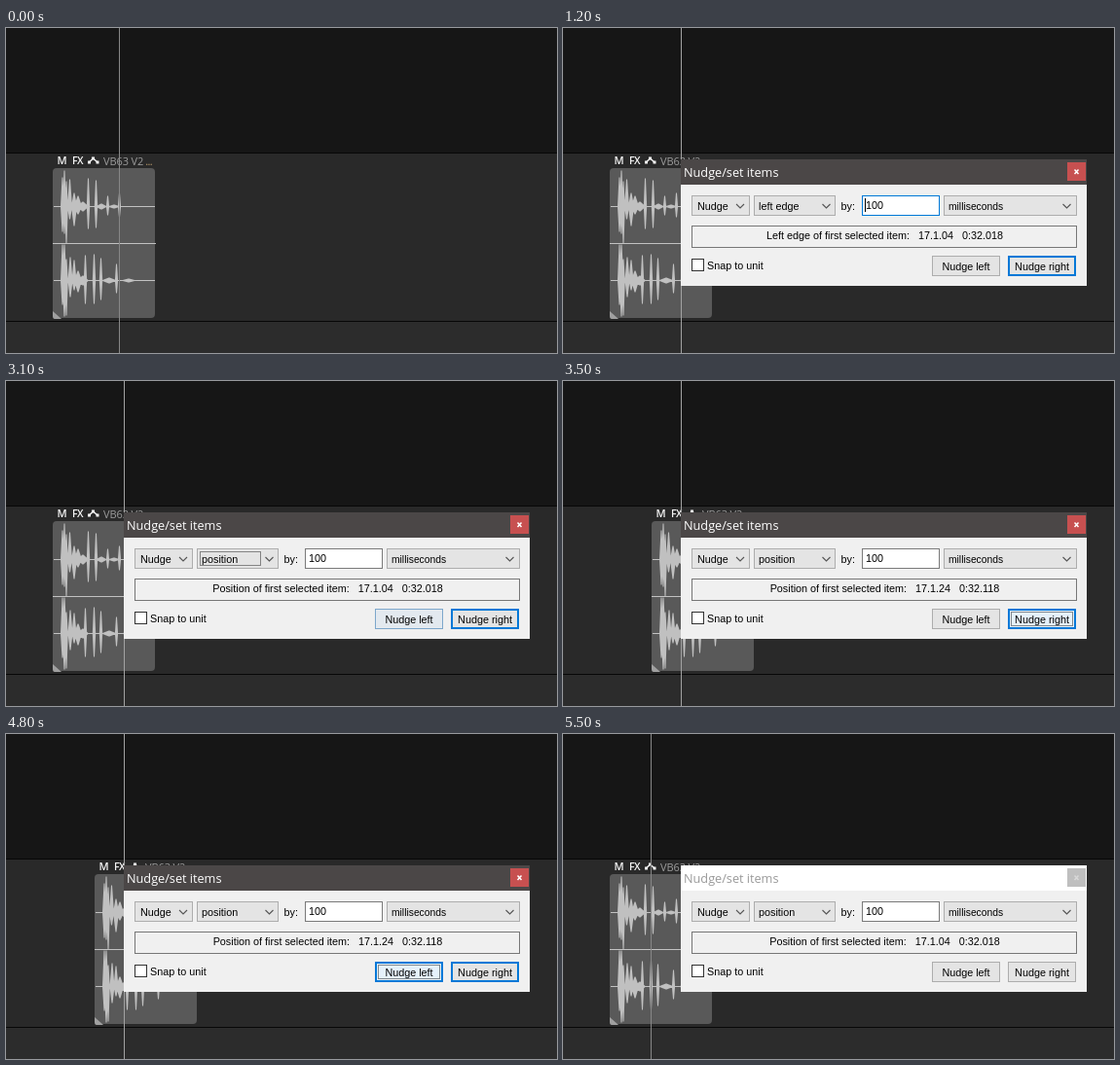
An HTML page that plays this animation: 566x334 px, repeating every 5.7 s.

```html
<!DOCTYPE html>
<html lang="en">
<head>
<meta charset="utf-8">
<title>Nudge items</title>
<style>
html, body { margin: 0; width: 100%; height: 100%; overflow: hidden; background: #161616; }
svg { display: block; width: 566px; height: 334px; }
text { font-family: "Liberation Sans", Arial, sans-serif; font-size: 10.8px; fill: #000; white-space: pre; }
.ui { font-family: "Open Sans", sans-serif; }
.mid { text-anchor: middle; }
.box { fill: #e4e4e4; stroke: #adadad; }
.field { fill: #fff; stroke: #7a7a7a; }
.field.focus { stroke: #0078d7; }
.fade .box { fill: #e3e9ef; stroke: #7da7cb; }
.hover .box { fill: #e5f1fb; stroke: #0078d7; }
.press .box { fill: #cce4f7; stroke: #0078d7; }
.ring { fill: none; stroke: #0078d7; stroke-width: 2; }
.dots { fill: none; stroke: #222; stroke-dasharray: 1 1; }
.chev { fill: none; stroke: #555; stroke-width: 1.1; }
#bar { fill: #4b4747; }
#close { fill: #c75050; }
#title { font-size: 12.7px; fill: #fff; }
.idle #bar { fill: #fff; }
.idle #title { fill: #999; }
.idle #close { fill: #bfbfbf; }
.idle #cross { stroke: #d8d8d8; }
</style>
</head>
<body>
<svg viewBox="0 0 566 334">
  <rect width="566" height="334" fill="#161616"/>
  <rect y="128" width="566" height="206" fill="#070707"/>
  <rect y="129" width="566" height="172" fill="#292929"/>
  <rect y="302" width="566" height="32" fill="#2c2c2c"/>

  <g id="item">
    <g class="ui" font-weight="600">
      <text class="ui" x="52.5" y="140" style="font-size:11px;fill:#f4f4f4">M</text>
      <text class="ui" x="68" y="140" style="font-size:10.5px;fill:#f4f4f4" letter-spacing="-.6">FX</text>
    </g>
    <path d="M85.500 138L89.500 134L94 138" fill="none" stroke="#f4f4f4" stroke-width="1.4"/>
    <path d="M84 136.500h3v3h-3zM88 132.500h3v3h-3zM92.500 136.500h3v3h-3z" fill="#f4f4f4"/>
    <text class="ui" x="100" y="141" style="font-size:11px;fill:#9c9c9c" letter-spacing="-.1">VB63 V2<tspan fill="#b79a6a" dx="2" letter-spacing="-.7">...</tspan></text>
    <rect x="48" y="144" width="105" height="154" rx="4" fill="#595959"/>
    <path d="M48 291L57 299H50Q48 299 48 296Z" fill="#a0a0a0"/>
    <path d="M48 221.500h106M49 183.500h104M49 259.500h104" stroke="#c2c2c2"/>
    <path id="wave" fill="#c0c0c0"/>
  </g>
  <rect id="line" y="0" width="1" height="334"/>

  <g id="dialog">
    <rect x="121" y="135" width="417" height="130" fill="#f0f0f0"/>
    <rect id="bar" x="121" y="135" width="417" height="26"/>
    <text id="title" class="ui" x="124" y="152.500">Nudge/set items</text>
    <rect id="close" x="518" y="138" width="19" height="19"/>
    <path id="cross" d="M525.500 145.500l4 4.500m0-4.500l-4 4.500" stroke="#fff" stroke-width="1.5"/>

    <g id="mode">
      <rect class="box" x="132.500" y="172.500" width="59" height="20"/>
      <text x="138" y="187">Nudge</text>
      <path class="chev" d="M178 181l4 4l4-4"/>
    </g>
    <g id="what">
      <rect class="box" x="196.500" y="172.500" width="83" height="20"/>
      <text id="whatText" x="201" y="187"></text>
      <path class="chev" d="M266.500 181l4 4l4-4"/>
      <rect id="whatDots" class="dots" x="199.500" y="175.500" width="62" height="14"/>
    </g>
    <text x="285.500" y="187">by:</text>
    <rect id="amount" class="field" x="307.500" y="172.500" width="79" height="20"/>
    <text x="311" y="186">100</text>
    <rect id="caret" x="310" y="175" width="1" height="14"/>
    <rect class="box" x="391.500" y="172.500" width="136" height="20"/>
    <text x="396" y="187" style="font-size:10.3px">milliseconds</text>
    <path class="chev" d="M513.500 181l4 4l4-4"/>

    <rect x="132.500" y="203.500" width="395" height="22" fill="#f0f0f0" stroke="#777"/>
    <text id="info" class="mid" x="330.500" y="217"></text>

    <rect x="132.500" y="237.500" width="12" height="12" fill="#fff" stroke="#333"/>
    <text x="148" y="248">Snap to unit</text>

    <g id="left">
      <rect class="box" x="379.500" y="234.500" width="69" height="20"/>
      <rect id="leftRing" class="ring" x="380" y="235" width="68" height="19"/>
      <rect id="leftDots" class="dots" x="382.500" y="237.500" width="63" height="14"/>
      <text class="mid" x="414" y="249">Nudge left</text>
    </g>
    <g id="right">
      <rect class="box" x="457.500" y="234.500" width="69" height="20"/>
      <rect id="rightRing" class="ring" x="458" y="235" width="68" height="19"/>
      <rect id="rightDots" class="dots" x="460.500" y="237.500" width="63" height="14"/>
      <text class="mid" x="492" y="249">Nudge right</text>
    </g>

    <g id="list">
      <rect x="196.500" y="193.500" width="83" height="105" fill="#fff" stroke="#0078d7"/>
      <rect id="mark" x="197" width="82" height="13" fill="#0078d7"/>
    </g>
  </g>
</svg>
<script>
const LOOP = 5700;
const $ = id => document.getElementById(id);
const names = ['position', 'left trim', 'left edge', 'end position',
  'right trim', 'contents', 'duplicate', 'edit cursor'];

// Each track holds [start in ms, value]; the value stays until the next entry.
const tracks = {
  line: [[0, 116], [400, 260], [500, 121], [5400, 48], [5500, 90]],
  shift: [[0, 0], [3500, 43], [4000, 85], [4500, 43], [4900, 0]],
  dialog: [[0, false], [1200, true]],
  idle: [[0, false], [5300, true]],
  mode: [[0, ''], [1500, 'hover'], [1600, 'fade'], [1700, '']],
  what: [[0, ''], [1600, 'fade'], [1700, 'hover'], [2000, 'press'],
    [2800, 'hover'], [2900, 'fade'], [3000, '']],
  whatDots: [[0, false], [2800, true], [3400, false]],
  edge: [[0, 2], [2800, 0]],
  caret: [[0, true], [1800, false]],
  focus: [[0, true], [2200, false]],
  list: [[0, false], [2000, true], [2800, false]],
  mark: [[0, 2], [2300, 1], [2700, 0]],
  left: [[0, ''], [2900, 'fade'], [3000, 'hover'], [3100, 'fade'], [3200, ''],
    [4300, 'hover'], [4400, 'press'], [4500, 'hover'], [4700, 'press'],
    [4800, 'hover'], [5100, 'fade'], [5200, '']],
  leftFocus: [[0, false], [4400, true], [5300, false]],
  right: [[0, ''], [3300, 'hover'], [3400, 'press'], [3500, 'hover'],
    [3900, 'press'], [4000, 'hover'], [4200, 'fade'], [4300, '']],
  rightFocus: [[0, false], [3400, true], [4400, false]]
};

// Peaks as [x, rise, fall, half width] around a channel's centre.
const channels = [
  [183.5, [[58, 30, 26, 2], [60, 37, 28, 1.8], [62, 26, 38, 1.8], [65.5, 28, 13, 2.5],
    [70, 14, 20, 3], [74, 11, 8, 4], [79, 5, 5, 6], [84.5, 29, 23, 1.7], [92.5, 27, 22, 1.7],
    [98, 3, 3, 6], [104.5, 11, 9, 1.6], [111, 2, 2, 7], [116.5, 14, 11, 1.6]]],
  [259.5, [[58, 37, 25, 2], [60, 37, 37, 2.4], [62, 22, 36, 1.8], [66, 24, 17, 2.5],
    [70, 21, 10, 2.5], [74, 10, 12, 4], [79, 5, 5, 6], [81.5, 26, 24, 1.7], [90.5, 27, 24, 1.7],
    [97.5, 23, 20, 1.7], [106, 3, 3, 8], [113.5, 17, 13, 1.6], [126, 2, 2, 8]]]
];

$('wave').setAttribute('d', channels.map(([mid, peaks]) =>
  peaks.map(([x, up, down, w]) =>
    `M${x - w} ${mid}L${x - .5} ${mid - up}h1L${x + w} ${mid}L${x + .5} ${mid + down}h-1Z`
  ).join('')).join(''));

const rows = names.map((name, i) => {
  const row = document.createElementNS('http://www.w3.org/2000/svg', 'text');
  row.setAttribute('x', 200);
  row.setAttribute('y', 205 + 13 * i);
  row.textContent = name;
  $('list').append(row);
  return row;
});

const at = (track, t) => track.findLast(([start]) => start <= t)[1];
const show = (id, on) => $(id).style.display = on ? '' : 'none';
const setText = (id, text) => {
  if ($(id).textContent !== text) $(id).textContent = text;
};

function draw(t) {
  const s = {};
  for (const key in tracks) s[key] = at(tracks[key], t);

  $('line').setAttribute('x', s.line);
  $('line').setAttribute('fill', s.line === 121 ? '#a2a2a2' : '#878787');
  $('item').setAttribute('transform', `translate(${s.shift})`);

  show('dialog', s.dialog);
  $('dialog').setAttribute('class', s.idle ? 'idle' : '');
  for (const id of ['mode', 'what', 'left', 'right']) $(id).setAttribute('class', s[id]);
  show('whatDots', s.whatDots);
  show('caret', s.caret);
  $('amount').setAttribute('class', s.focus ? 'field focus' : 'field');
  show('leftRing', s.leftFocus);
  show('leftDots', s.leftFocus);
  show('rightRing', !s.idle);
  show('rightDots', s.rightFocus);

  show('list', s.list);
  $('mark').setAttribute('y', 194 + 13 * s.mark);
  rows.forEach((row, i) => row.style.fill = i === s.mark ? '#fff' : '#000');

  const step = Math.round(s.shift / 42.5);
  const label = s.edge ? 'Left edge' : 'Position';
  setText('whatText', names[s.edge]);
  setText('info', `${label} of first selected item:   17.1.${step * 2}4   0:32.${step}18`
    .replace(/\u0020{3}/g, '\u00a0\u00a0\u00a0'));
}

function tick() {
  draw(performance.now() % LOOP);
  requestAnimationFrame(tick);
}
tick();
</script>
</body>
</html>
```
